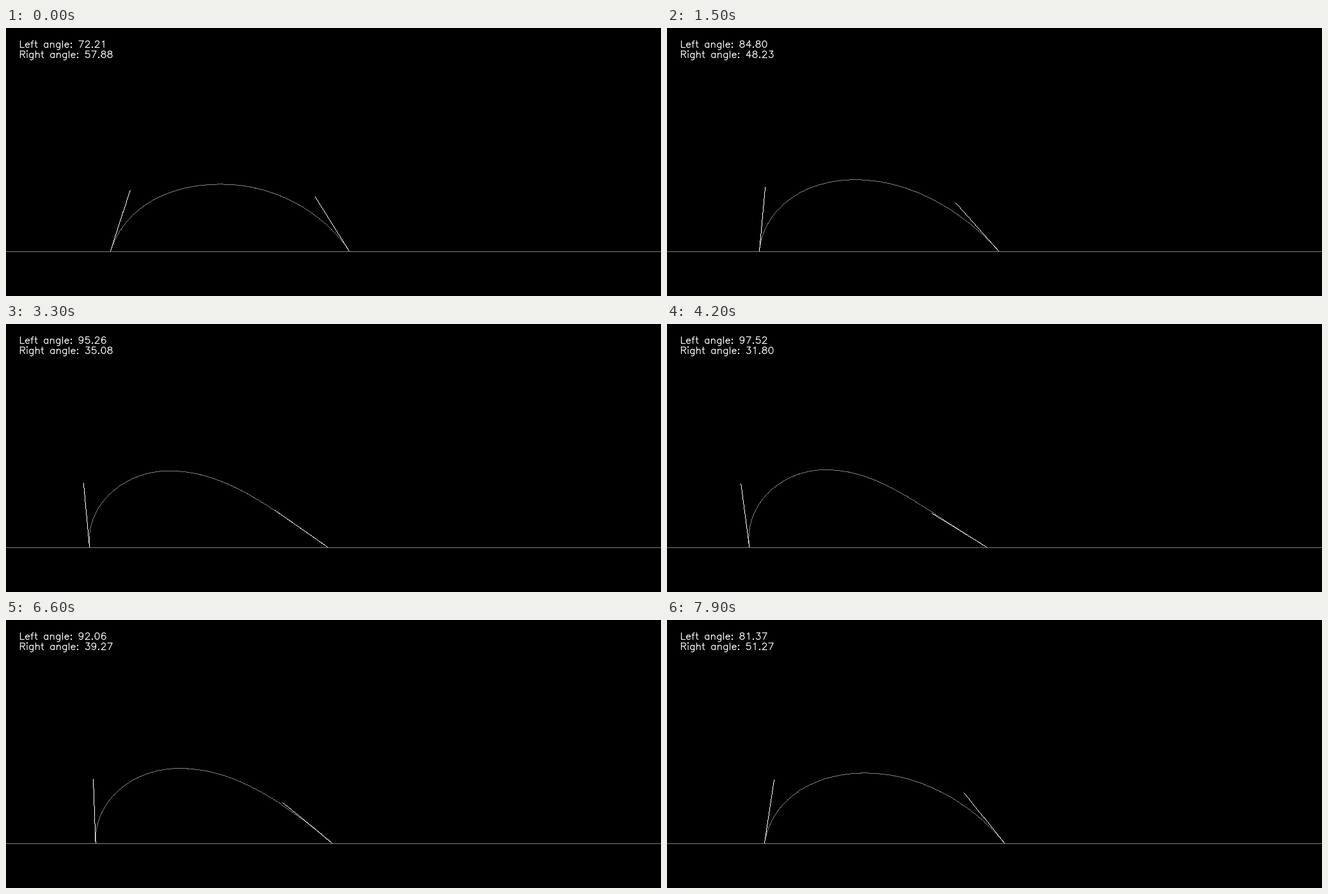
A matplotlib script that plays this animation: 1024x420 px, repeating every 8000 ms.

```python
import numpy as np
import matplotlib.pyplot as plt
from matplotlib.animation import FuncAnimation
from matplotlib.collections import LineCollection

W, H = 1024, 420
DPI = 100
FRAMES, INTERVAL = 80, 100
BASE_Y = 350
GRAY, WHITE = 0.5, 1.0
TANGENT = 100
TEXT_SCALE = 0.5

# ---- motion: one smooth quartic swing through five key poses ----

KEY_STEPS = [1, 15, 33, 57, 79]
# left angle, right angle, left contact x, right contact x
KEY_POSES = [
    (72.21, 57.88, 163, 536),
    (84.80, 48.23, 144, 518),
    (95.26, 35.08, 130, 502),
    (96.19, 33.73, 133, 502),
    (81.37, 51.27, 152, 527),
]


def to_unit(step):
    return np.array(step) / 40 - 1


SWING = np.polyfit(to_unit(KEY_STEPS), KEY_POSES, 4)


def pose(frame):
    # the first pose is held for two frames
    return to_unit(max(frame, 1)) ** np.arange(4, -1, -1) @ SWING


# ---- pixel drawing ----

def draw_path(canvas, points, shade):
    """One-pixel line without antialiasing."""
    for (x0, y0), (x1, y1) in zip(points[:-1], points[1:]):
        count = int(np.ceil(max(abs(x1 - x0), abs(y1 - y0)))) + 1
        xs = np.rint(np.linspace(x0, x1, count)).astype(int)
        ys = np.rint(np.linspace(y0, y1, count)).astype(int)
        canvas[ys, xs] = shade


def bezier(p0, p1, p2, p3, count=30):
    t = np.linspace(0, 1, count)[:, None]
    return ((1 - t)**3 * p0 + 3 * t * (1 - t)**2 * p1
            + 3 * t**2 * (1 - t) * p2 + t**3 * p3)


def drop_outline(left, right, left_dir, right_dir, left_angle, right_angle):
    # the steeper the left side against the right, the more the drop leans
    lean = left_angle - right_angle
    apex = np.array([(left[0] + right[0]) / 2 - 1.02 * lean, 249 - 0.32 * lean])
    half, height = apex[0] - left[0], left[1] - apex[1]
    crown = 85 + 0.8 * (right_angle - 33.7)
    foot = 79 / np.tan(np.radians(right_angle))
    rise = bezier(left, left + 0.565 * height * left_dir, apex - [0.565 * half, 0], apex)
    fall = bezier(apex, apex + [crown, 0], right + foot * right_dir, right)
    return np.vstack([rise, fall])


# ---- single-stroke lettering from lines and arcs, capitals 21 units high ----

def arc(cx, cy, rx, ry, start, end):
    a = np.radians(np.linspace(start, end, 17))
    return list(zip(cx + rx * np.cos(a), cy + ry * np.sin(a)))


def ring(cx, cy, rx, ry):
    return arc(cx, cy, rx, ry, 180, 540)


def dot(x, y):
    return ring(x, y, 1, 1)


def stem(x, top):
    return [(x, top), (x, 0)]


def turned(strokes):
    return [[(20 - x, 21 - y) for x, y in stroke] for stroke in strokes]


BOWL = arc(9.5, 7, 6.5, 7, 35, 325)
ARCH = [(4, 10)] + arc(10, 9.5, 5, 4.5, 150, 0) + [(15, 0)]
CROSSBAR = [(2, 14), (9, 14)]
SIX = [arc(11, 10.5, 7, 10.5, 45, 180) + ring(10.5, 6.5, 6.5, 6.5)]

# glyph: (advance, strokes)
LETTERS = {
    " ": (16, []),
    ".": (10, [dot(5, 1)]),
    ":": (10, [dot(5, 13), dot(5, 1)]),
    "L": (17, [stem(4, 21) + [(16, 0)]]),
    "R": (21, [stem(4, 21), [(4, 21)] + arc(13, 16, 5, 5, 90, -90) + [(4, 11)],
               [(11, 11), (18, 0)]]),
    "a": (19, [stem(15, 14), BOWL]),
    "e": (18, [[(3, 8)] + arc(9.3, 7, 6.2, 7, 12, 325)]),
    "f": (12, [[(5, 0)] + arc(10, 16.5, 5, 4.5, 180, 90), CROSSBAR]),
    "g": (19, [[(15, 14)] + arc(9, -1, 6, 6, 0, -120), BOWL]),
    "h": (19, [stem(4, 21), ARCH]),
    "i": (8, [dot(4, 21), stem(4, 14)]),
    "l": (8, [stem(4, 21)]),
    "n": (19, [stem(4, 14), ARCH]),
    "r": (13, [stem(4, 14), arc(11, 7, 7, 7, 180, 80)]),
    "t": (12, [[(5, 21)] + arc(10, 4.5, 5, 4.5, 180, 270), CROSSBAR]),
}
DIGITS = [
    [ring(10, 10.5, 7, 10.5)],
    [[(6, 17), (8, 18)] + stem(11, 21)],
    [arc(10, 15.5, 6, 5.5, 175, -25) + [(13, 10), (3, 0), (17, 0)]],
    [[(5, 21), (16, 21), (10, 13)] + arc(10, 6.5, 7, 6.5, 62, -157)],
    [[(13, 21), (3, 7), (18, 7)], stem(13, 21)],
    [[(15, 21), (5, 21), (4, 12)] + arc(10, 7, 7, 7, 130, -157)],
    SIX,
    [[(3, 21), (17, 21), (7, 0)]],
    [ring(10, 16.5, 6, 4.5), ring(10, 6, 7, 6)],
    turned(SIX),
]
GLYPHS = {**LETTERS, **{str(d): (20, s) for d, s in enumerate(DIGITS)}}


def lettering(text, x, y):
    lines = []
    for char in text:
        advance, strokes = GLYPHS[char]
        for stroke in strokes:
            lines.append([x, y] + np.array(stroke) * [TEXT_SCALE, -TEXT_SCALE])
        x += advance * TEXT_SCALE
    return lines


# ---- figure ----

fig = plt.figure(figsize=(W / DPI, H / DPI), dpi=DPI, facecolor="black")
ax = fig.add_axes([0, 0, 1, 1])
picture = ax.imshow(np.zeros((H, W)), cmap="gray", vmin=0, vmax=1,
                    interpolation="nearest", aspect="auto")
ax.axis("off")
ax.set_xlim(-0.5, W - 0.5)
ax.set_ylim(H - 0.5, -0.5)
labels = LineCollection([], colors="white", linewidths=1.2 * 72 / DPI, capstyle="round")
labels.set_snap(False)
ax.add_collection(labels, autolim=False)


def update(frame):
    left_angle, right_angle, left_x, right_x = pose(frame)
    left = np.array([left_x, BASE_Y - 1])
    right = np.array([right_x, BASE_Y - 1])
    a, b = np.radians([left_angle, right_angle])
    left_dir = np.array([np.cos(a), -np.sin(a)])
    right_dir = np.array([-np.cos(b), -np.sin(b)])

    canvas = np.zeros((H, W))
    canvas[BASE_Y] = GRAY
    outline = drop_outline(left, right, left_dir, right_dir, left_angle, right_angle)
    draw_path(canvas, outline, GRAY)
    draw_path(canvas, [left, left + TANGENT * left_dir], WHITE)
    draw_path(canvas, [right, right + TANGENT * right_dir], WHITE)
    picture.set_data(canvas)
    labels.set_segments(lettering(f"Left angle: {left_angle:.2f}", 20, 30)
                        + lettering(f"Right angle: {right_angle:.2f}", 20, 46))
    return picture, labels


anim = FuncAnimation(fig, update, frames=FRAMES, interval=INTERVAL,
                     repeat=True, repeat_delay=0)
plt.show()
```
